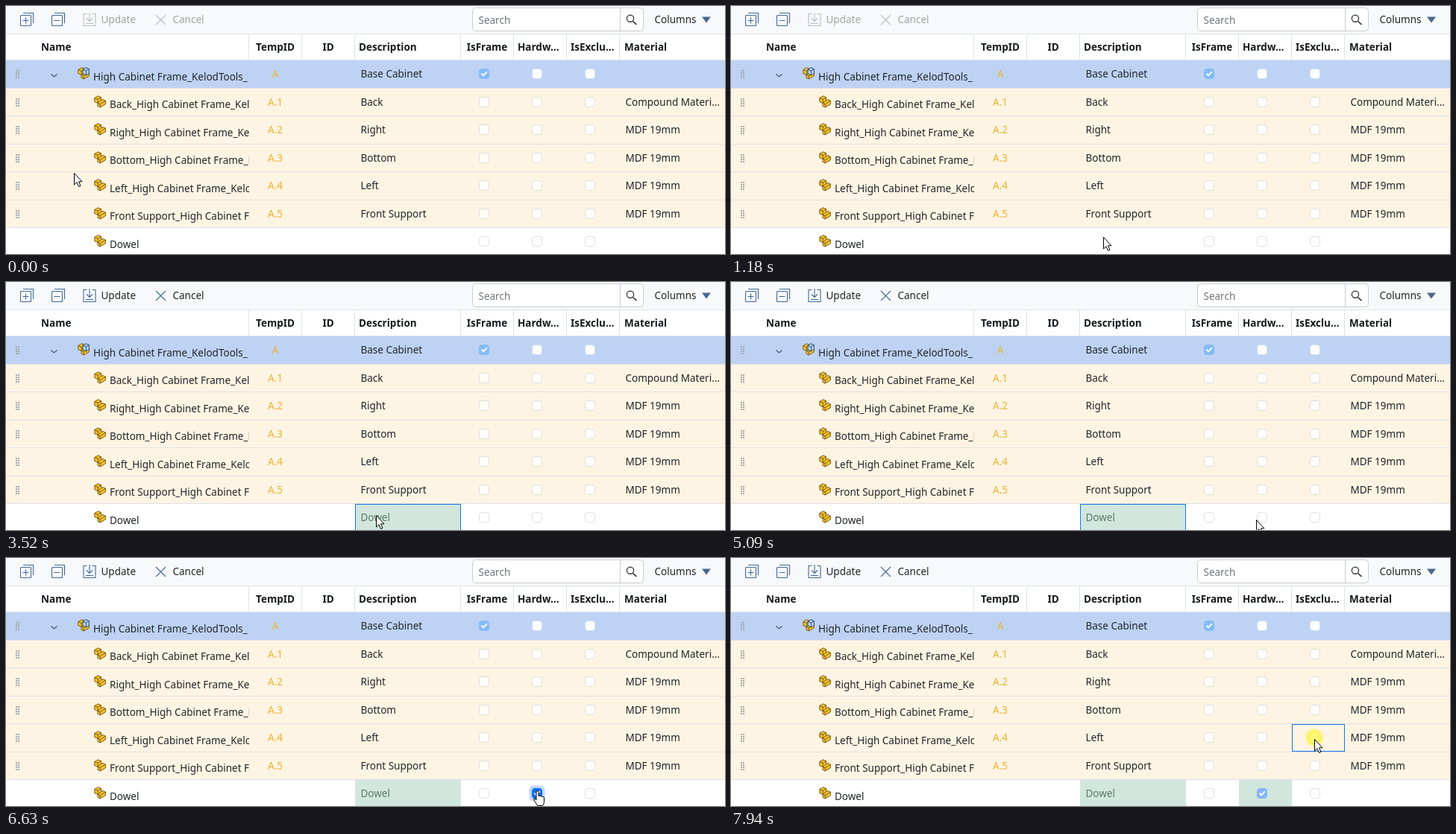
An HTML page that plays this animation: 964 px wide and 333 px high, repeating every 8000 ms.

```html
<!DOCTYPE html>
<html lang="en">
<head>
<meta charset="utf-8">
<title>Parts table</title>
<style>
html, body { margin: 0; width: 100%; height: 100%; overflow: hidden; background: #fff; }
svg { display: block; font: 13.5px "Noto Sans", "Open Sans", sans-serif; fill: #212529; }
.head { font-weight: 700; fill: #16191d; }
.mid { text-anchor: middle; }
.temp { fill: #ecb22e; }
.line { fill: none; stroke: #dee2e6; }
.icon { fill: none; stroke: #41699a; stroke-width: 1.1; }
.off { opacity: .4; filter: grayscale(.7); }
.focus { fill: none; stroke: #1a73e8; }
.tick { fill: none; stroke: #fff; stroke-width: 1.9; stroke-linecap: round; stroke-linejoin: round; }
</style>
</head>
<body>
<svg width="964" height="333" viewBox="0 0 964 333">
  <defs>
    <clipPath id="nameClip"><rect y="73" width="326" height="260"/></clipPath>
    <g id="part" stroke="#6b4a08" stroke-width=".9" stroke-linejoin="round">
      <path d="M.8 3.500 5.500.8 9.500 2.600V6.700L12 5.500 15.400 7.200V11.800L8.200 16 5 14.400V10.500L.8 8.600Z" fill="#f7c530"/>
      <path d="M.8 3.500 5.200 5.400 9.500 2.600M5.200 5.400v5L8.200 11.800 15.400 7.200M8.200 11.800V16M5.200 10.400 9.500 6.700" fill="none"/>
    </g>
    <g id="assembly">
      <use href="#part"/>
      <path d="M7 3 11 .8 15.400 2.600V8.400L11.400 11 7 8.800Z" fill="#b9d4f2" stroke="#27496f" stroke-linejoin="round"/>
      <path d="M7 3l4.400 2 4-2.400M11.400 5v6" fill="none" stroke="#27496f"/>
    </g>
    <path id="tick" class="tick" d="M-3 .2-.8 2.500 3.200-2.200"/>
  </defs>

  <rect width="964" height="37" fill="#f8f9fb"/>
  <g class="icon">
    <rect x="19.5" y="12.5" width="14" height="14" rx="1"/>
    <path d="M23 9.500h13.500V23M26.500 15.500v8M22.500 19.500h8"/>
    <rect x="61.5" y="12.5" width="14" height="14" rx="1"/>
    <path d="M65 9.500h13.500V23M64.500 19.500h8"/>
  </g>
  <g id="actions">
    <path class="icon" d="M108.500 10.500h-4.500v16h16v-16h-4.500M112 9v11M108 16.500l4 4 4-4M107 23.500h10"/>
    <text x="127.5" y="23">Update</text>
    <path class="icon" d="M201 12l13 13M214 12l-13 13"/>
    <text x="223.5" y="23">Cancel</text>
  </g>
  <rect x="625.5" y="2.5" width="229" height="31" rx="4" fill="#fff" stroke="#c8cdd3"/>
  <path d="M823.500 3v30" stroke="#c8cdd3"/>
  <text x="633.5" y="24" fill="#6c757d">Search</text>
  <path d="M840.500 20.500 845.500 25" stroke="#222" stroke-width="1.5"/>
  <circle cx="837" cy="16.7" r="4.6" fill="none" stroke="#222" stroke-width="1.2"/>
  <text x="869.5" y="23">Columns</text>
  <path d="M933 14.500h12l-6 8Z" fill="#4b668c"/>

  <g id="table"></g>

  <g id="desc">
    <rect x="468" y="298" width="142" height="35" fill="#d1e7dd"/>
    <text x="475.5" y="321" fill="#58796b">Dowel</text>
  </g>
  <rect id="hardCell" x="681" y="298" width="71" height="35" fill="#d1e7dd"/>
  <g transform="translate(712 316)">
    <rect id="halo" x="-10.5" y="-10.5" width="21" height="21" rx="6" fill="#c0d9fe"/>
    <rect id="boxFace" x="-6.5" y="-6.5" width="13" height="13" rx="3.5"/>
    <use id="boxTick" href="#tick"/>
  </g>
  <rect id="focusDesc" class="focus" x="468.5" y="298.5" width="141" height="37"/>
  <rect id="focusHard" class="focus" x="681.5" y="298.5" width="70" height="37"/>
  <rect id="focusExcl" class="focus" x="752.5" y="223.5" width="70" height="36"/>
  <g id="editor">
    <rect x="473" y="297" width="133" height="38" rx="6" fill="#c2dafd"/>
    <rect x="476.5" y="300.5" width="126" height="31" rx="4" fill="#fff" stroke="#86b7fe"/>
    <text id="typed" x="485" y="321"></text>
    <rect id="caret" y="308" width="1" height="17"/>
  </g>

  <circle id="click" r="11.5" fill="#fbf53a" opacity=".7"/>
  <path id="arrow" d="M.5.5V16L4 12.700 6.500 18.500 8.900 17.400 6.500 11.800H11Z" fill="#fff" stroke="#000"/>
  <path id="beam" d="M-3-7.500h2.500L0-7l.5-.5H3M0-7V7M-3 7.500h2.500L0 7l.5.5H3" fill="none" stroke="#000" stroke-width="1.3"/>
  <path id="hand" d="M-1.500 1.200a1.500 1.500 0 0 1 3 0V6.500q1.500-1 2.600.4 1.500-.8 2.500.6 2.400-.6 2.400 1.600V14q0 3-2 5.500H0L-4.500 12q-.8-2 1-2l2 2Z" fill="#fff" stroke="#000"/>
</svg>
<script>
const $ = id => document.getElementById(id);
const show = (id, on) => $(id).style.display = on ? '' : 'none';

const text = (x, y, s, cls = '') => `<text x="${x}" y="${y}" class="${cls}">${s}</text>`;
const checkbox = (x, y, face, edge) =>
  `<rect x="${x - 6.5}" y="${y - 6.5}" width="13" height="13" rx="3.5" fill="${face}" stroke="${edge}"/>`;

function buildTable() {
  const tail = '_High Cabinet Frame_KelodTools_';
  const parts = ['Base Cabinet', 'Back', 'Right', 'Bottom', 'Left', 'Front Support', 'Dowel'];
  let out = '<path class="line" d="M0 37.5H964M0 72.5H964' +
    [325, 396, 467, 609, 680, 751, 822].map(x => `M${x}.5 38V72`).join('') + '"/>';
  out += text(47, 60, 'Name', 'head') + text(361, 60, 'TempID', 'head mid') +
    text(432, 60, 'ID', 'head mid') + text(473, 60, 'Description', 'head') +
    text(645, 60, 'IsFrame', 'head mid') + text(686, 60, 'Hardw…', 'head') +
    text(757, 60, 'IsExclu…', 'head') + text(829, 60, 'Material', 'head');

  parts.forEach((part, i) => {
    const top = Math.round(73 + 37.5 * i), mid = Math.round(91 + 37.5 * i), base = mid + 5;
    const root = i === 0, loose = i === 6;
    const fill = root ? '#bed3f3' : loose ? '#fff' : '#fef4e3';
    const [face, edge] = root ? ['#fdfdfe', '#d3dff0'] : loose ? ['#fff', '#dfe1e4'] : ['#fffdfa', '#dfdfde'];
    out += `<rect y="${top}" width="964" height="38" fill="${fill}"/>`;
    if (!root) out += `<path class="line" d="M0 ${top - .5}H964"/>`;
    if (!loose) {
      for (let k = 0; k < 8; k++)
        out += `<rect x="${13 + k % 2 * 3}" y="${mid - 5 + (k >> 1) * 3}" width="2" height="2" fill="#a0a6ad"/>`;
      out += text(475.5, base, part) + text(361, base, root ? 'A' : 'A.' + i, 'mid temp');
      if (!root) out += text(830.5, base, i === 1 ? 'Compound Materi…' : 'MDF 19mm');
    }
    const name = root ? tail.slice(1) : loose ? part : part + tail;
    out += `<g clip-path="url(#nameClip)">${text(root ? 117 : 139, Math.round(99.6 + 37.5 * i), name)}</g>`;
    out += `<use href="#${root ? 'assembly' : 'part'}" x="${root ? 96 : 118}" y="${mid - 9}"/>`;
    [641, 712, 783].forEach((x, k) => {
      if (loose && k === 1) return;
      const checked = root && k === 0;
      out += checkbox(x, mid, checked ? '#84bbf6' : face, checked ? '#84bbf6' : edge);
      if (checked) out += `<use href="#tick" x="${x}" y="${mid}"/>`;
    });
  });
  out += '<path d="M60.5 91.5l4 3.5 4-3.5" fill="none" stroke="#44546a" stroke-width="1.1"/>';
  $('table').innerHTML = out;
}

// Pointer moves: start, last step, number of steps, end point
const moves = [
  [200, 970, 12, 498, 300],
  [1040, 1180, 3, 499, 310],
  [1250, 1320, 2, 496, 313],
  [4400, 5160, 12, 708, 320],
  [5220, 5290, 2, 711, 318],
  [6630, 7390, 12, 782, 253],
  [7460, 7660, 4, 782, 243]
];
const clicks = [[1390, 1530], [1600, 1740], [5290, 5430], [5490, 5630], [6170, 6290], [7790, 8000]];
const keys = [2790, 2990, 3080, 3170, 3250];

function pointer(t) {
  let x = 91, y = 224;
  for (const [from, to, steps, endX, endY] of moves) {
    if (t < from) break;
    const step = Math.floor((t - from) / (to - from) * (steps - 1) + .001) + 1;
    const p = Math.min(1, step / steps);
    x += (endX - x) * p * p * (3 - 2 * p);
    y += (endY - y) * p;
  }
  return [Math.round(x), Math.round(y)];
}

function draw(t) {
  const within = (a, b) => t >= a && t < b;
  const [x, y] = pointer(t);
  const place = (id, dx, dy) => $(id).setAttribute('transform', `translate(${x + dx} ${y + dy})`);

  const editing = within(1800, 3520), edited = t >= 3520;
  $('actions').setAttribute('class', edited ? '' : 'off');
  show('desc', edited);
  show('editor', editing);
  if (editing) {
    $('typed').textContent = 'Dowel'.slice(0, keys.filter(k => t >= k).length);
    $('caret').setAttribute('x', Math.floor(485 + $('typed').getComputedTextLength()));
    show('caret', !within(2320, 2790));
  }

  const saved = t >= 7870, active = t >= 5560 && !saved, checked = t >= 6230;
  show('hardCell', saved);
  show('halo', active);
  show('boxTick', checked);
  const color = saved ? '#86b4f8' : '#0d6efd';
  $('boxFace').setAttribute('fill', checked ? color : '#fff');
  $('boxFace').setAttribute('stroke', checked ? color : active ? '#25477d' : '#dfe1e4');

  show('focusDesc', within(1460, 1800) || within(3520, 5360));
  show('focusHard', within(5360, 5560));
  show('focusExcl', saved);

  const hand = within(5560, 6770);
  show('click', clicks.some(c => within(...c)));
  show('hand', hand);
  show('beam', editing);
  show('arrow', !hand && !editing);
  place('click', 0, -2);
  place('arrow', 0, 0);
  place('hand', .5, 0);
  place('beam', 1.5, 1);
}

buildTable();
function frame() {
  draw(performance.now() % 8000);
  requestAnimationFrame(frame);
}
frame();
</script>
</body>
</html>
```
